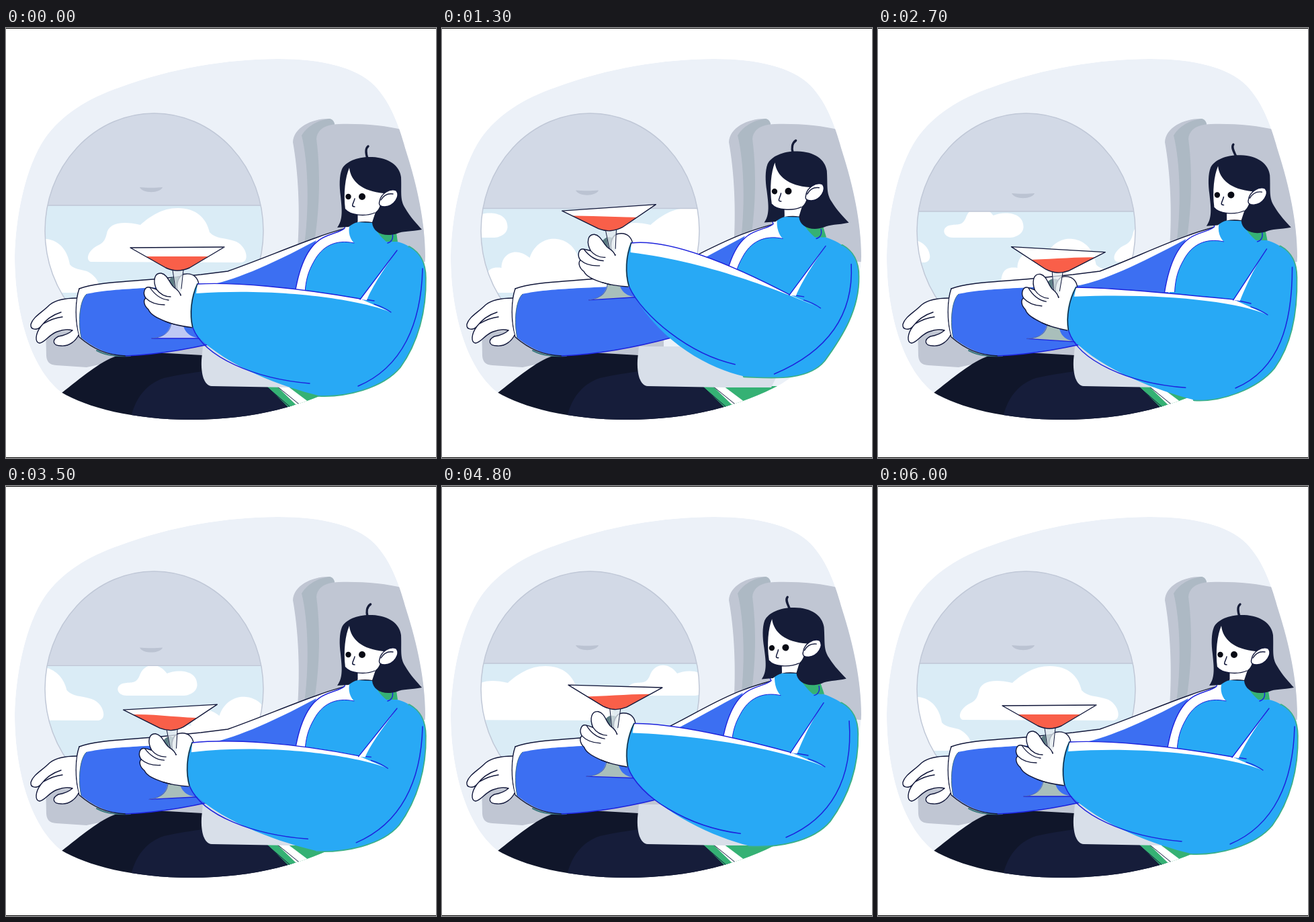
Write an HTML page with a canvas that moves like this. It is 640 px wide and 640 px high and loops after 6100 ms.

```html
<!DOCTYPE html>
<html lang="en">
<head>
<meta charset="utf-8">
<title>In-flight drink</title>
<style>
html, body { margin: 0; width: 100%; height: 100%; overflow: hidden; background: #fff; }
canvas { display: block; width: 100%; height: 100%; }
</style>
</head>
<body>
<canvas id="stage" width="640" height="640"></canvas>
<script>
const ctx = document.getElementById('stage').getContext('2d');
const LOOP = 6100, CYCLE = 6000, BEAT = 3000, STEP = 100, DRIFT = 510;
const NAVY = '#151c38', INK = '#11173a', LINE = '#1d22dc', SKY = '#28a9f5',
  SLEEVE = '#3c6ff2', GREEN = '#35b174', SEAT = '#c0c6d3', WHITE = '#fff';

// time, hand x, hand y, hand turn, elbow x, elbow y, strip x, strip y, sprout lean
const POSES = [
  [0, 0, 0, 0, 0, 0, 0, 0, 0],
  [800, -8, -3, -4.1, -7, -5, -7, -4, 5],
  [1200, -2, -58, -4.2, -30, -18, -10, -6, 5],
  [1800, 0, -29, 2, -12, -10, -3, -5, -4],
  [2300, 11.5, -1, 6.6, 11, 1, 10, 0, -9],
  [2700, 8, 2, 3.7, 8, 3, 7, 4, -5]
];

// Periodic smooth curve through one column of the pose table
function pose(t, col) {
  const n = POSES.length;
  const at = i => {
    const turn = Math.floor(i / n), row = POSES[i - turn * n];
    return [row[0] + turn * BEAT, row[col]];
  };
  let i = n - 1;
  while (POSES[i][0] > t) i--;
  const [a, b, c, d] = [at(i - 1), at(i), at(i + 1), at(i + 2)];
  const span = c[0] - b[0], s = (t - b[0]) / span;
  const m0 = (c[1] - a[1]) / (c[0] - a[0]) * span;
  const m1 = (d[1] - b[1]) / (d[0] - b[0]) * span;
  const s2 = s * s, s3 = s2 * s;
  return (2 * s3 - 3 * s2 + 1) * b[1] + (s3 - 2 * s2 + s) * m0
    + (3 * s2 - 2 * s3) * c[1] + (s3 - s2) * m1;
}

const smooth = (a, b, x) => {
  const s = Math.min(1, Math.max(0, (x - a) / (b - a)));
  return s * s * (3 - 2 * s);
};

function fill(d, color) {
  ctx.fillStyle = color;
  ctx.fill(new Path2D(d));
}
function stroke(d, color = INK, width = 1.4) {
  ctx.strokeStyle = color;
  ctx.lineWidth = width;
  ctx.stroke(new Path2D(d));
}
function shape(d, color, line, width) {
  fill(d, color);
  stroke(d, line, width);
}
function group(draw) {
  ctx.save();
  draw();
  ctx.restore();
}
function turn(deg, x, y) {
  ctx.translate(x, y);
  ctx.rotate(deg * Math.PI / 180);
  ctx.translate(-x, -y);
}

const BLOB = 'M13,340 C14,283 28,208 58,164 C82,130 120,105 170,88 C245,60 330,46 405,46 C470,46 520,58 548,85 C575,113 586,150 596,185 C612,235 624,290 624,340 C622,410 585,480 505,530 C445,562 370,583 275,583 C190,583 120,565 82,542 C35,505 13,420 13,340Z';
const BIG_CLOUD = 'M126,348 C117,344 124,329 138,323 C146,319 148,314 150,306 C152,291 172,286 200,293 C215,280 232,268 256,268 C282,268 298,282 303,304 C312,314 325,312 340,317 C358,323 364,348 350,349Z';
const LOW_CLOUD = 'M-47,394 C-48,360 -40,355 -22,357 C-22,335 0,325 20,342 C28,318 48,312 60,314 C80,316 92,332 95,352 C104,362 118,358 127,366 C138,374 142,388 138,394Z';
const HIGH_CLOUD = 'M-118,312 C-134,312 -137,294 -118,293 C-110,292 -104,294 -99,283 C-92,262 -70,262 -58,279 C-45,273 -13,272 -13,296 C-13,306 -24,312 -34,312Z';

function drawWindow(t) {
  const oval = new Path2D();
  oval.ellipse(220.5, 302, 162.5, 175, 0, 0, Math.PI * 2);
  const blind = 264 + 9 * (smooth(900, 1700, t) - smooth(2800, 4000, t));
  group(() => {
    ctx.clip(oval);
    ctx.fillStyle = '#daecf6';
    ctx.fillRect(50, 120, 340, 370);
    const off = t % CYCLE / CYCLE * DRIFT;
    for (const x of [off - DRIFT, off]) group(() => {
      ctx.translate(x, 0);
      for (const cloud of [BIG_CLOUD, LOW_CLOUD, HIGH_CLOUD]) fill(cloud, WHITE);
    });
    ctx.fillStyle = '#d2d9e6';
    ctx.fillRect(50, 120, 340, blind - 120);
    stroke(`M50,${blind} H390`, '#bfc7d6', 1.3);
    ctx.translate(0, blind - 264);
    fill('M199,237 C207,238 225,238 233,237 C230,246 204,247 199,237Z', '#bbc3d2');
  });
  ctx.strokeStyle = '#c0c8d7';
  ctx.lineWidth = 1.5;
  ctx.stroke(oval);
}

function drawSeat() {
  fill('M434,330 C438,270 435,215 427,170 C428,148 455,135 480,135 C488,136 490,142 489,148 L470,330Z', SEAT);
  fill('M443,330 C452,270 450,200 440,160 C450,143 470,136 482,135 C488,136 490,143 489,148 L470,155 L470,330Z', '#adb9c4');
  fill('M457,330 C468,270 468,210 462,165 C464,150 475,144 495,143 C530,142 565,145 592,152 L640,152 V350Z', SEAT);
  fill('M59,440 L125,440 L190,490 L120,505 L75,502 C64,501 61,497 60,488Z', SEAT);
}

function drawLegs() {
  fill('M180,490 L330,450 L330,500 L200,500Z', SEAT);
  fill('M83,543 C110,522 140,496 165,488 C180,483 205,483 240,484 L310,488 L440,575 L275,600 L120,580Z', '#10162a');
  fill('M186,580 C192,552 208,530 235,521 C260,515 290,512 310,508 L400,530 L440,575 L275,600Z', '#161d3a');
  fill('M388,533 H530 L428,572Z', GREEN);
  fill('M403,533 H419 L455,560 L437,566Z', WHITE);
  stroke('M388,534 L424,565 M403,533 L440,563', INK, 1);
  fill('M293,474 H520 L490,535 L420,535 L306,533 C295,532 290,516 291,494Z', '#d8dfe9');
}

function drawFarArm(bend) {
  const top = 'M109,388 C135,378 180,378 240,372 L290,367 L330,362 C375,346r 425,325s 462,312s C480,305s 495,301s 506,298s';
  fill(bend(top + ' L480,400 L300,440 L150,470 L108,460 C102,430 103,405 109,388Z'), WHITE);
  fill(bend('M120,396 C150,389 200,387 300,383 C335,377r 390,355s 462,316s C450,340s 440,365s 430,410 L345,460 C290,475 230,486 178,488 C150,487 128,474 112,461 C107,440 109,405 120,396Z'), SLEEVE);
  stroke('M135,480 C150,488 165,489 185,488', '#3d7a80', 2);
  stroke(bend(top), INK, 1.4);
  stroke('M109,388 C103,405 102,435 109,460 C130,478 150,487 178,488');
  stroke('M178,488 C230,486 290,475 345,460', LINE, 1.4);
  stroke('M112,461 C107,440 109,405 120,396', '#3f6f8c', 1);
}

function drawFarHand() {
  fill('M105,402 C88,402 75,404 65,412 C53,424 40,430 37,441 C36,450 47,450 52,444 C43,456 43,468 50,469 C58,468 63,457 76,452 L97,450 C92,456 85,458 78,459 C68,464 69,473 82,473 C95,474 104,465 108,457 C103,440 102,420 105,402Z', WHITE);
  stroke('M105,402 C88,402 75,404 65,412 C53,424 40,430 37,441 C36,450 47,450 52,444 C58,436 66,428 82,423 M52,444 C43,456 43,468 50,469 C58,468 63,457 76,452 C84,449 92,448 99,450 M56,440 C66,434 75,431 84,430 M99,450 C92,456 85,458 78,459 C68,464 69,473 82,473 C95,474 104,465 108,457');
}

function drawGlass(rot, beat, early) {
  const bowl = 'M185,327 L238,357 Q247,361 255,361 Q264,361 273,357 L325,326Z';
  fill('M217,462 C238,460 246,450 246,430 L262,430 C263,450 270,460 290,462Z', early ? '#bfc8f4' : '#a9bfbb');
  stroke('M217,462 H290', LINE, 1.4);
  stroke('M217,462 C238,460 246,450 246,436', '#4a66b8', 1);
  fill('M242,376 C249,366 262,370 266,382 L262,394 L246,394Z', '#5c7d84');
  shape('M256,394 C252,380 257,366 268,366 C280,365 286,373 287,382 L276,410Z', WHITE);
  fill('M248,360 L251,392 H261 L264,360Z', 'rgba(225,233,238,.75)');
  stroke('M248,360 L252,388 M264,360 L261,388', INK, 1);
  fill(bowl, WHITE);
  group(() => {
    ctx.clip(new Path2D(bowl));
    turn(-rot, 255, 340);
    const wave = -7 * Math.sin(beat / BEAT * Math.PI * 2);
    fill(`M170,340 C225,${340 + wave * 1.5} 285,${340 - wave * 1.5} 340,340 V375 H170Z`, '#f95f49');
  });
  stroke(bowl);
}

function drawGrip() {
  const outline = 'M278,446 C262,444 250,442 238,437 C226,432 215,427 212,419 C205,413 204,405 208,402 C203,395 206,384 214,386 C219,387 221,388 224,389 C218,376 221,364 231,365 C241,367 243,380 250,386 C256,390 259,394 260,398';
  fill(outline + ' L285,384 C275,405 274,425 278,446Z', WHITE);
  stroke(outline);
  stroke('M208,402 C216,410 226,412 236,412 M214,386 C222,398 232,404 242,405 M224,389 C230,397 237,400 245,400 M238,437 L250,441', INK, 1.3);
}

function drawTorso(bend) {
  fill(bend('M436,420s C438,350s 452,322s 474,312s C486,306s 500,303s 504,298s C504,293n 508,289n 514,288n L550,289n C560,305s 570,316s 582,318s C603,323r 620,338r 624,360r L600,460g L460,480e Z'), SKY);
  fill(bend('M544,286n L580,298n L583,318s L566,318s C556,310s 548,298s 544,286n Z'), GREEN);
  const outer = 'M430,395s C437,352s 450,322s 474,311s C486,305s 500,303s 504,298s';
  fill(bend(outer + ' C504,293n 508,289n 514,288n C508,298s 510,312s 518,320s C490,314s 470,325s 458,348s C450,362s 446,375s 445,395s Z'), WHITE);
  stroke(bend(outer + ' C504,293n 508,289n 514,288n'), LINE, 1.4);
  stroke(bend('M445,395s C446,375s 450,362s 458,348s C470,325s 490,314s 518,320s'), LINE, 1);
  stroke(bend('M575,306s C577,314s 573,319s 568,320s'), LINE, 1.4);
}

function drawNearArm(bend) {
  const edge = 'M285,381h C340,378h 430,386m 527,403w';
  const side = 'M600,326r C618,336r 624,352r 624,372r C625,420r 613,468g 586,505g C560,536g 505,549f 465,547f';
  const cuff = 'M278,446h C273,425h 276,400h 285,381h';
  stroke(bend(side), '#3bb088', 3.5);
  stroke(bend(cuff), '#62b9bd', 2.6);
  fill(bend(edge + ' L575,335s ' + side.replace('M', 'L')
    + ' C415,535f 330,505m 283,457h C272,440h 275,400h 285,381h Z'), SKY);
  fill(bend(edge + ' L573,423k C530,405w 410,386m 283,395h Z'), WHITE);
  stroke(bend(edge + ' L548,406k'), LINE, 1.4);
  stroke(bend('M573,423k C563,416k 555,413k 548,411k'), LINE, 1.3);
  fill(bend('M582,331s L527,404w L537,405w C545,385w 565,355s 582,331s Z'), WHITE);
  stroke(bend('M582,331s L527,404w'), LINE, 1.4);
  stroke(bend(cuff), INK, 1.3);
  stroke(bend('M278,446h C295,490h 370,522m 452,529f'), LINE, 1.5);
  stroke(bend('M524,533e C590,505e 618,440r 620,358s'), LINE, 1.5);
}

function drawHead(lean) {
  fill('M493,297 C502,285 500,270 498,250 C496,235 496,220 500,210 C506,198 525,191 545,192 C570,193 586,205 588,222 C589,245 586,255 594,268 C602,282 612,292 619,300 C603,303 590,302 582,306 C562,312 546,304 545,290 L524,289 C518,290 514,293 510,296Z', NAVY);
  fill('M523,275 V289 Q535,287 545,289 L552,268Z', WHITE);
  stroke('M523,278 V288', INK, 1);
  fill('M511,208 C505,222 502,245 505,270 C512,279 535,281 549,275 C556,270 556,264 558,262 L562,246 C530,243 513,228 511,208Z', WHITE);
  stroke('M505,270 C512,279 535,281 549,275', INK, 1.3);
  shape('M556,258 C558,246 572,238 581,242 C587,250 578,265 564,266 C558,266 554,264 556,258Z', WHITE);
  stroke('M558,256 C562,249 569,246 576,247', INK, 1.4);
  ctx.fillStyle = '#080a14';
  for (const x of [509.5, 530]) {
    ctx.beginPath();
    ctx.arc(x, 251, x < 520 ? 4.2 : 5, 0, Math.PI * 2);
    ctx.fill();
  }
  stroke('M519,254 C518,260 512,266 519,266', INK, 1.5);
  const tip = 539 + lean;
  stroke(`M538,194 C${536 + lean * .1},188 ${534 + lean * .7},180 ${tip},176`, NAVY, 3.4);
}

function draw(t) {
  const beat = t % BEAT;
  const [hx, hy, rot, ex, ey, kx, ky, lean] = [1, 2, 3, 4, 5, 6, 7, 8].map(c => pose(beat, c));
  const sway = ms => (1 - Math.cos((ms - 250) / BEAT * Math.PI * 2)) / 2;
  const u = sway(beat) - sway(0);
  const a = rot * Math.PI / 180, cos = Math.cos(a), sin = Math.sin(a);
  const mix = (p, q) => [(p[0] + q[0]) / 2, (p[1] + q[1]) / 2];

  // Each tagged point of a path follows one joint, or the mean of two
  const e = [ex, ey], k = [kx, ky], s = [-15 * u, -9 * u], r = [-6 * u, -3 * u];
  const bend = d => d.replace(/(-?[\d.]+),(-?[\d.]+)([a-z])/g, (_, sx, sy, tag) => {
    const x = +sx, y = +sy, dx = x - 240, dy = y - 410;
    const h = [240 + hx + dx * cos - dy * sin - x, 410 + hy + dx * sin + dy * cos - y];
    const m = mix(h, k);
    const v = { h, e, k, s, r, m, n: [-20 * u, -11 * u], w: mix(k, s), f: mix(e, m), g: mix(e, r) }[tag];
    return `${x + v[0]},${y + v[1]}`;
  });

  ctx.fillStyle = WHITE;
  ctx.fillRect(0, 0, 640, 640);
  ctx.lineCap = ctx.lineJoin = 'round';
  group(() => {
    ctx.clip(new Path2D(BLOB));
    fill(BLOB, '#ecf1f8');
    drawWindow(t);
    drawSeat();
    drawLegs();
  });
  drawFarArm(bend);
  drawFarHand();
  drawTorso(bend);
  group(() => {
    ctx.translate(hx, hy);
    turn(rot, 240, 410);
    drawGlass(rot, beat, t < 1000);
    drawGrip();
  });
  drawNearArm(bend);
  group(() => {
    ctx.translate(-20 * u, -11 * u);
    turn(-1.8 * u, 520, 251);
    drawHead(lean);
  });
  ctx.fillStyle = '#000';
  ctx.fillRect(0, 0, 640, 1);
  ctx.fillRect(0, 639, 640, 1);
}

function tick() {
  draw(Math.floor(performance.now() % LOOP / STEP) * STEP);
  requestAnimationFrame(tick);
}
tick();
</script>
</body>
</html>
```
